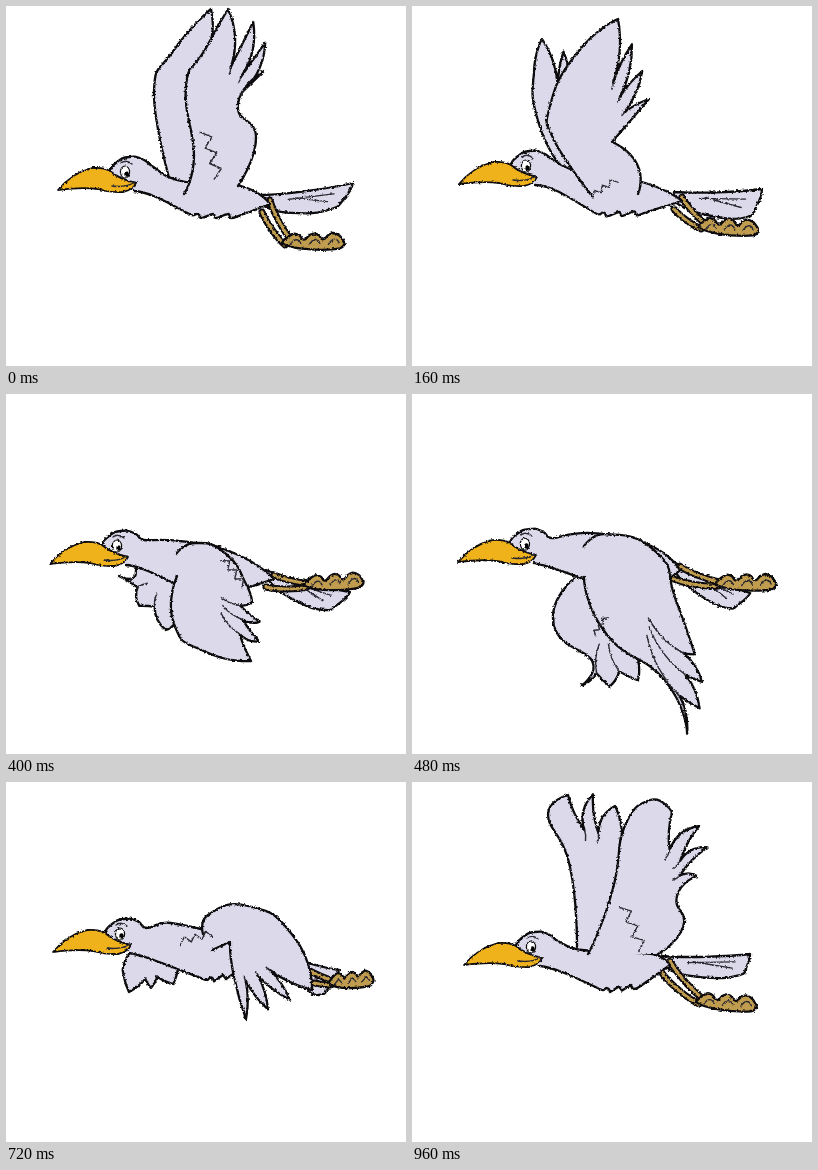
Recreate the animation shown at these times as an HTML page. Size 400 by 360 pixels, loop 1.04 s.

```html
<!DOCTYPE html>
<html lang="en">
<head>
<meta charset="utf-8">
<title>Flying bird</title>
<style>
html, body { margin: 0; width: 100%; height: 100%; overflow: hidden; background: #fff; }
svg { display: block; width: 400px; height: 360px; }
path, ellipse { stroke: #0d0b0d; stroke-width: 2.3; stroke-linejoin: round; stroke-linecap: round; }
.plume { fill: #dcdaea; }
.foot { fill: #c09c4e; }
.legEdge { fill: none; stroke-width: 7; }
.leg { fill: none; stroke: #c09c4e; stroke-width: 3; }
.line { fill: none; stroke: #2b2932; stroke-width: 1.4; }
.beak { fill: #efb21b; stroke-width: 1.8; }
.eye { fill: #fff; stroke-width: 1.2; }
.pupil { stroke: none; }
</style>
</head>
<body>
<svg viewBox="0 0 400 360">
  <filter id="rough" filterUnits="userSpaceOnUse" x="0" y="0" width="400" height="360" color-interpolation-filters="sRGB">
    <feTurbulence type="fractalNoise" baseFrequency=".45" numOctaves="2" seed="4"/>
    <feDisplacementMap in="SourceGraphic" scale="3" xChannelSelector="R" yChannelSelector="G"/>
  </filter>
  <g filter="url(#rough)">
    <g id="back"></g>
    <g id="head">
      <path class="beak" d="M52 184Q66 167 86 162Q97 161 104 165Q113 173 130 177Q127 184 117 186Q104 187 92 183Q76 181 52 184Z"/>
      <path class="line" d="M106 180Q120 182 129 176"/>
      <ellipse class="eye" cx="119" cy="166" rx="4.6" ry="6"/>
      <ellipse class="pupil" cx="120.5" cy="168" rx="2.2" ry="2.8"/>
      <path class="line" d="M115 157Q120 153 126 158"/>
    </g>
    <g id="front"></g>
  </g>
</svg>
<script>
const pts = s => s.split(" ").map(p => p.split(",").map(Number));
// A wing: front edge from the root, first and last feather tip, rear edge.
const wing = (front, tips, back) => ({ front: pts(front), tips: pts(tips), back: pts(back) });
// Torso: two points on the back, the rump, two on the belly.
// Limbs: upper and lower tail corner, heel, toe. Feather: arch of tips, bend, depth of gaps.
const pose = (head, torso, limbs, tuft, feather, near, far) =>
  ({ head, torso: pts(torso), limbs: pts(limbs), tuft: pts(tuft), feather, near, far });

const high = pose([0, 0], "175,175 235,180 264,198 235,209 185,209",
  "347,177 325,203 278,236 338,235", "198,125 212,172", [.24, -.1, .45],
  wing("178,188 188,150 180,80 200,42", "222,3 258,65", "232,98 250,132 232,180"),
  wing("163,172 148,85 168,44", "205,3 214,35", "210,70 205,120 190,180"));

const raised = pose([-5, -6], "165,165 230,176 270,195 235,206 185,208",
  "350,183 335,211 288,220 346,222", "180,190 204,174", [.05, -.03, .45],
  wing("180,190 142,134 138,100 165,47", "206,13 237,93", "200,136 225,158 226,188"),
  wing("150,162 126,115 122,65", "130,33 172,60", "170,100 172,140 170,170"));

const level = pose([-8, -12], "200,154 240,168 272,188 235,197 185,198",
  "352,179 342,199 288,203 354,203", "198,168 222,188", [.17, 0, .45],
  wing("190,190 132,158 130,115 148,68", "167,52 217,131", "203,155 197,170 204,188"),
  wing("125,150 99,128 99,102", "114,82 148,105", "146,120 148,140 150,165"));

const folded = pose([-8, -14], "182,148 230,160 268,185 235,196 190,200",
  "344,198 318,216 300,190 357,186", "217,165 238,192", [.15, -.15, .28],
  wing("170,160 190,149 220,160 240,190", "246,208 245,267", "200,258 168,230 171,182"),
  wing("175,170 178,195 172,225", "160,236 113,182", "127,184 131,172 138,158"));

const down = pose([-6, -16], "185,139 240,152 268,176 230,205 180,188",
  "338,199 316,214 305,189 364,188", "181,243 193,224", [.14, .05, .2],
  wing("172,152 195,140 245,158 264,205", "284,262 276,342", "255,288 195,240 172,183"),
  wing("205,195 220,240 228,268", "228,288 171,295", "182,270 142,232 163,185"));

const lift = pose([-5, -14], "165,141 250,162 290,184 240,190 200,198",
  "333,188 312,213 324,200 367,196", "174,160 206,152", [0, 0, .45],
  wing("197,152 202,133 242,124 288,155", "306,208 240,237", "228,195 224,160 206,168"),
  wing("172,175 172,185 170,195", "167,202 123,210", "118,195 118,182 125,170"));

const peak = pose([0, -1], "170,168 240,172 258,183 230,203 190,208",
  "338,172 328,193 286,219 344,222", "211,124 230,168", [.33, .2, .4],
  wing("176,172 200,110 212,46 238,18", "260,30 285,94", "265,114 271,145 246,172"),
  wing("165,165 158,85 136,33", "156,13 203,24", "210,50 210,100 190,175"));

// Key poses in time; the last value is how far the move overshoots.
const keys = [[0, high, 0], [160, raised, 0], [320, level, 0], [400, folded, .6],
  [600, down, 0], [720, lift, 0], [960, peak, 0]];
const starts = [0, 80, 160, 240, 320, 360, 400, 480, 560, 600, 720, 800, 840, 880, 960];

// Blends numbers, and whole poses through their parts.
function mix(a, b, t) {
  if (typeof a === "number") return a + (b - a) * t;
  if (Array.isArray(a)) return a.map((v, i) => mix(v, b[i], t));
  return Object.fromEntries(Object.keys(a).map(k => [k, mix(a[k], b[k], t)]));
}

function poseAt(time) {
  const i = keys.findLastIndex(k => k[0] <= time);
  const [from, a, over] = keys[i];
  if (time === from) return a;
  const [to, b] = keys[i + 1], t = (time - from) / (to - from);
  return mix(a, b, t + over * Math.sin(Math.PI * t));
}

const add = (p, x, y) => [p[0] + x, p[1] + y];
const fmt = list => list.map(v => v.toFixed(1)).join(" ");
const move = p => "M" + fmt(p);

// Point beside the line p-q at u, pushed out to its left by k lengths.
const beside = (p, q, u, k) => add(mix(p, q, u), (q[1] - p[1]) * k, (p[0] - q[0]) * k);
const bow = (p, q, k) => "Q" + fmt([...beside(p, q, .5, k), ...q]);

// Smooth curve through points; sharp turns stay sharp.
function spline(list, closed) {
  const n = list.length;
  const get = i => closed ? list[(i + n) % n] : list[Math.max(0, Math.min(n - 1, i))];
  const tangent = i => {
    const [a, p, b] = [get(i - 1), get(i), get(i + 1)];
    const ux = p[0] - a[0], uy = p[1] - a[1], vx = b[0] - p[0], vy = b[1] - p[1];
    const lu = Math.hypot(ux, uy), lv = Math.hypot(vx, vy);
    if (!lu || !lv || (ux * vx + uy * vy) / (lu * lv) < .1) return [0, 0];
    const m = Math.min(lu, lv) / (lu + lv) / 1.6;
    return [(ux + vx) * m, (uy + vy) * m];
  };
  let d = "";
  for (let i = 0; i < (closed ? n : n - 1); i++) {
    const p = get(i), q = get(i + 1), s = tangent(i), e = tangent(i + 1);
    d += "C" + fmt([...add(p, ...s), ...add(q, -e[0], -e[1]), ...q]);
  }
  return d;
}

const path = (name, d) => `<path class="${name}" d="${d}"/>`;
const shape = (name, list, closed) => path(name, move(list[0]) + spline(list, closed) + (closed ? "Z" : ""));
const line = (...list) => shape("line", list);

// Feathers fan between the two tips; gaps reach toward the wing's middle.
function drawWing({ front, tips: [first, last], back }, [arch, bend, deep], count) {
  const middle = list => list.reduce((s, p) => add(s, p[0] / list.length, p[1] / list.length), [0, 0]);
  const hub = mix(middle(front), middle(back), .5);
  const tips = Array.from({ length: count }, (_, i) => {
    const u = i / (count - 1);
    return beside(first, last, u, 4 * u * (1 - u) * arch);
  });
  let d = move(front[0]) + spline([...front, first]), quills = "";
  for (let i = 1; i < count; i++) {
    const gap = mix(mix(tips[i - 1], tips[i], .5), hub, deep);
    d += bow(tips[i - 1], gap, .1 - bend) + bow(gap, tips[i], .1 + bend);
    quills += move(gap) + bow(gap, mix(gap, hub, 1 - 2 * deep), .15);
  }
  return path("plume", d + spline([last, ...back])) + path("line", quills);
}

function drawBody([x, y], [nape, back, rump, belly, chest]) {
  const own = s => pts(s).map(p => add(p, x, y));
  const ruffle = [.2, .5, .8].flatMap(u => [add(mix(belly, chest, u), 0, 3), add(mix(belly, chest, u), -3, -1)]);
  return shape("plume", [...own("104,164 111,156 123,151 136,153 146,160"), nape, back, rump,
    belly, ...ruffle, chest, ...own("150,191 128,185")]);
}

function drawTail(rump, upper, lower) {
  const top = add(rump, -8, -9), base = add(rump, -4, 3);
  const rib = u => line(mix(rump, upper, .15 + u / 5), mix(rump, mix(upper, lower, u), .85));
  return shape("plume", [top, beside(top, upper, .5, -.02), upper, beside(upper, lower, .5, .1),
    lower, beside(lower, base, .5, .08), base], true) + rib(.35) + rib(.7);
}

function drawFeet(rump, heel, toe) {
  const on = (u, y) => add(mix(heel, toe, u), 0, y);
  const leg = (a, b) => ["legEdge", "leg"].map(c => shape(c, [a, beside(a, b, .5, -.05), b])).join("");
  const toes = [.18, .5, .82];
  return leg(add(rump, -8, 8), on(.02, 3)) + leg(add(rump, 0, -4), on(.15, 0)) +
    shape("foot", [on(-.04, 1), ...toes.flatMap(u => [on(u - .06, -7), on(u + .06, -7), on(u + .15, -2)]),
      on(1, 4), on(.85, 8), on(.3, 7)], true) +
    toes.map(u => line(on(u - .08, 3), on(u + .02, -2), on(u + .1, 2))).join("");
}

function drawTuft([a, b]) {
  const zigzag = Array.from({ length: 7 }, (_, i) => beside(a, b, i / 6, i % 2 ? .12 : -.08));
  return line(...zigzag);
}

const el = id => document.getElementById(id);

function draw({ head, torso, limbs: [upper, lower, heel, toe], tuft, feather, near, far }) {
  const rump = torso[2], [arch, bend, deep] = feather;
  el("back").innerHTML = drawWing(far, [arch * .4, bend, deep], 3) +
    drawTail(rump, upper, lower) + drawFeet(rump, heel, toe) + drawBody(head, torso);
  el("head").setAttribute("transform", `translate(${head})`);
  el("front").innerHTML = drawWing(near, feather, 4) + drawTuft(tuft);
}

let shown = -1;
function tick() {
  const now = performance.now() % 1040;
  const start = starts.findLast(s => s <= now);
  if (start !== shown) draw(poseAt(shown = start));
  requestAnimationFrame(tick);
}
tick();
</script>
</body>
</html>
```
